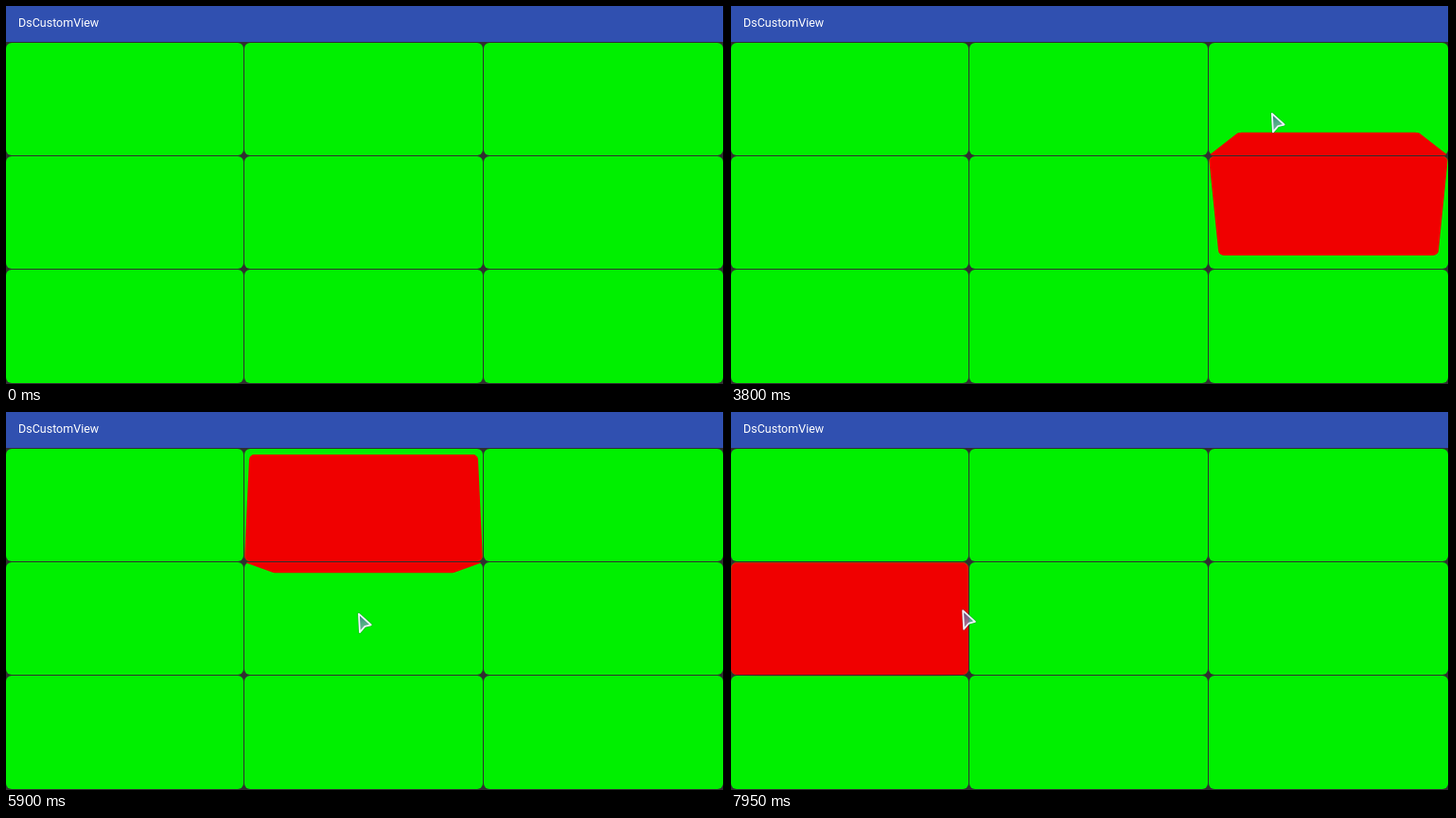
An HTML page with a canvas for the animation above (8 s loop, 760 by 400 pixels).

```html
<!DOCTYPE html>
<html lang="en">
<head>
<meta charset="utf-8">
<title>DsCustomView</title>
<style>
  html, body { margin: 0; width: 100%; height: 100%; overflow: hidden; background: #303030; }
  canvas { display: block; width: 760px; height: 400px; }
</style>
</head>
<body>
<canvas id="stage" width="760" height="400"></canvas>
<script>
const ctx = document.getElementById('stage').getContext('2d');
const LOOP = 8000, STEP = 50, TURN = 190, DEPTH = 350, RADIUS = 6;
const GREEN = '#00f000', RED = '#f00000';
const COL_EDGES = [0, 252, 505, 759], ROW_EDGES = [39, 159, 279, 400];

// Focus appears in the middle left cell, then rolls one cell per letter.
const FOCUS_START = 2186;
const ROUTE = 'DRRUULDDLUURDRULDDLUR';
const MOVES = { U: [0, -1], D: [0, 1], L: [-1, 0], R: [1, 0] };

// The pace of the rolls, even between these [step, time] marks.
const PACE = [[0, 2700], [4, 3748], [7, 4519], [8, 4871], [12, 5865], [16, 7098], [19, 7766], [20, 8120]];

const ease = u => 0.5 - 0.5 * Math.cos(Math.PI * Math.min(1, Math.max(0, u)));
const lerp = (a, b, u) => a + (b - a) * u;

function rollTime(step) {
  const i = Math.max(1, PACE.findIndex(([mark]) => mark >= step));
  const [s0, t0] = PACE[i - 1], [s1, t1] = PACE[i];
  return lerp(t0, t1, (step - s0) / (s1 - s0));
}

function cellBox(col, row) {
  const x = COL_EDGES[col], y = ROW_EDGES[row];
  const w = COL_EDGES[col + 1] - x - 1, h = ROW_EDGES[row + 1] - y - 1;
  return { x, y, w, h, cx: x + w / 2, cy: y + h / 2 };
}

const rolls = [];
let col = 0, row = 1;
const firstBox = cellBox(col, row);
[...ROUTE].forEach((letter, step) => {
  const [dx, dy] = MOVES[letter], from = cellBox(col, row);
  col += dx;
  row += dy;
  rolls.push({ time: rollTime(step), dx, dy, from, to: cellBox(col, row) });
});

// The pointer enters from the corner, then rounds the cells a little inside their centres.
const pointerPath = [
  [1500, 744, 396], [2100, 52, 150], [2250, 82, 199],
  ...rolls.map(({ time, to }) => [time + 60, lerp(378, to.cx, 0.75), lerp(219, to.cy, 0.9)])
];

function fillRound(x, y, w, h, r, color) {
  ctx.fillStyle = color;
  ctx.beginPath();
  ctx.roundRect(x, y, w, h, r);
  ctx.fill();
}

function outline({ cx, cy, w, h }) {
  const points = [];
  for (let corner = 0; corner < 4; corner++) {
    const sx = corner % 3 ? -1 : 1, sy = corner < 2 ? 1 : -1;
    for (let k = 0; k <= 6; k++) {
      const a = (corner + k / 6) * Math.PI / 2;
      points.push([
        cx + sx * (w / 2 - RADIUS) + RADIUS * Math.cos(a),
        cy + sy * (h / 2 - RADIUS) + RADIUS * Math.sin(a)
      ]);
    }
  }
  return points;
}

// Draws a cell swung back by an angle about its edge on the side (dx, dy).
function drawSwung(box, dx, dy, angle) {
  const c = Math.cos(angle), s = Math.sin(angle);
  const hingeX = box.cx + dx * box.w / 2, hingeY = box.cy + dy * box.h / 2;
  ctx.fillStyle = RED;
  ctx.beginPath();
  for (const [x, y] of outline(box)) {
    const reach = dx ? (hingeX - x) * dx : (hingeY - y) * dy;
    const p = DEPTH / (DEPTH + reach * s);
    const px = dx ? hingeX - dx * reach * c * p : lerp(box.cx, x, p);
    const py = dy ? hingeY - dy * reach * c * p : lerp(box.cy, y, p);
    ctx.lineTo(px, py);
  }
  ctx.fill();
}

function drawFocus(t) {
  if (t < FOCUS_START) return;
  const roll = rolls.filter(r => r.time <= t).pop();
  if (!roll) {
    const k = ease((t - FOCUS_START) / TURN), { cx, cy, w, h } = firstBox;
    fillRound(cx - w * k / 2, cy - h * k / 2, w * k, h * k, RADIUS * k, RED);
    return;
  }
  const { time, dx, dy, from, to } = roll;
  const angle = ease((t - time) / TURN) * Math.PI / 2;
  drawSwung(from, dx, dy, angle);
  drawSwung(to, -dx, -dy, Math.PI / 2 - angle);
}

// Smooth curve through the path points.
function pointerAt(t) {
  const next = pointerPath.findIndex(p => p[0] > t);
  if (next === 0) return pointerPath[0].slice(1);
  const b = pointerPath[next - 1], c = pointerPath[next];
  const a = pointerPath[next - 2] || b, d = pointerPath[next + 1] || c;
  const span = c[0] - b[0], u = (t - b[0]) / span;
  return [1, 2].map(n => {
    const m0 = a === b ? 0 : (c[n] - a[n]) / (c[0] - a[0]) * span;
    const m1 = (d[n] - b[n]) / (d[0] - b[0]) * span;
    return lerp(b[n], c[n], u * u * (3 - 2 * u)) + u * (1 - u) * (m0 * (1 - u) - m1 * u);
  });
}

function drawPointer(t) {
  if (t < STEP) return;
  ctx.save();
  ctx.translate(...pointerAt(t));
  const arrow = new Path2D('M1 1.5 L13.8 13.2 L7.4 14.8 L2 21 Z');
  const glass = ctx.createLinearGradient(2, 2, 8, 19);
  glass.addColorStop(0, 'rgba(60, 90, 160, 0.75)');
  glass.addColorStop(1, 'rgba(160, 180, 215, 0.65)');
  ctx.lineJoin = 'round';
  ctx.strokeStyle = 'rgba(40, 60, 90, 0.3)';
  ctx.lineWidth = 3.2;
  ctx.stroke(arrow);
  ctx.fillStyle = glass;
  ctx.fill(arrow);
  ctx.strokeStyle = '#eef4fa';
  ctx.lineWidth = 1.8;
  ctx.stroke(arrow);
  ctx.restore();
}

function drawScene(t) {
  ctx.fillStyle = '#303030';
  ctx.fillRect(0, 0, 760, 400);
  ctx.fillStyle = '#3050b0';
  ctx.fillRect(0, 0, 758, 38);
  ctx.fillStyle = '#000';
  ctx.fillRect(758, 0, 2, 400);
  ctx.fillStyle = '#fff';
  ctx.font = '12.5px Roboto, sans-serif';
  ctx.fillText('DsCustomView', 13, 21.5);
  for (let r = 0; r < 3; r++) {
    for (let c = 0; c < 3; c++) {
      const { x, y, w, h } = cellBox(c, r);
      fillRound(x, y, w, h, RADIUS, GREEN);
    }
  }
  drawFocus(t);
  drawPointer(t);
}

function frame() {
  let t = Math.floor(performance.now() % LOOP / STEP) * STEP;
  if (t > 2250 && t < 2450) t = 2250;
  drawScene(t);
  requestAnimationFrame(frame);
}
frame();
</script>
</body>
</html>
```
